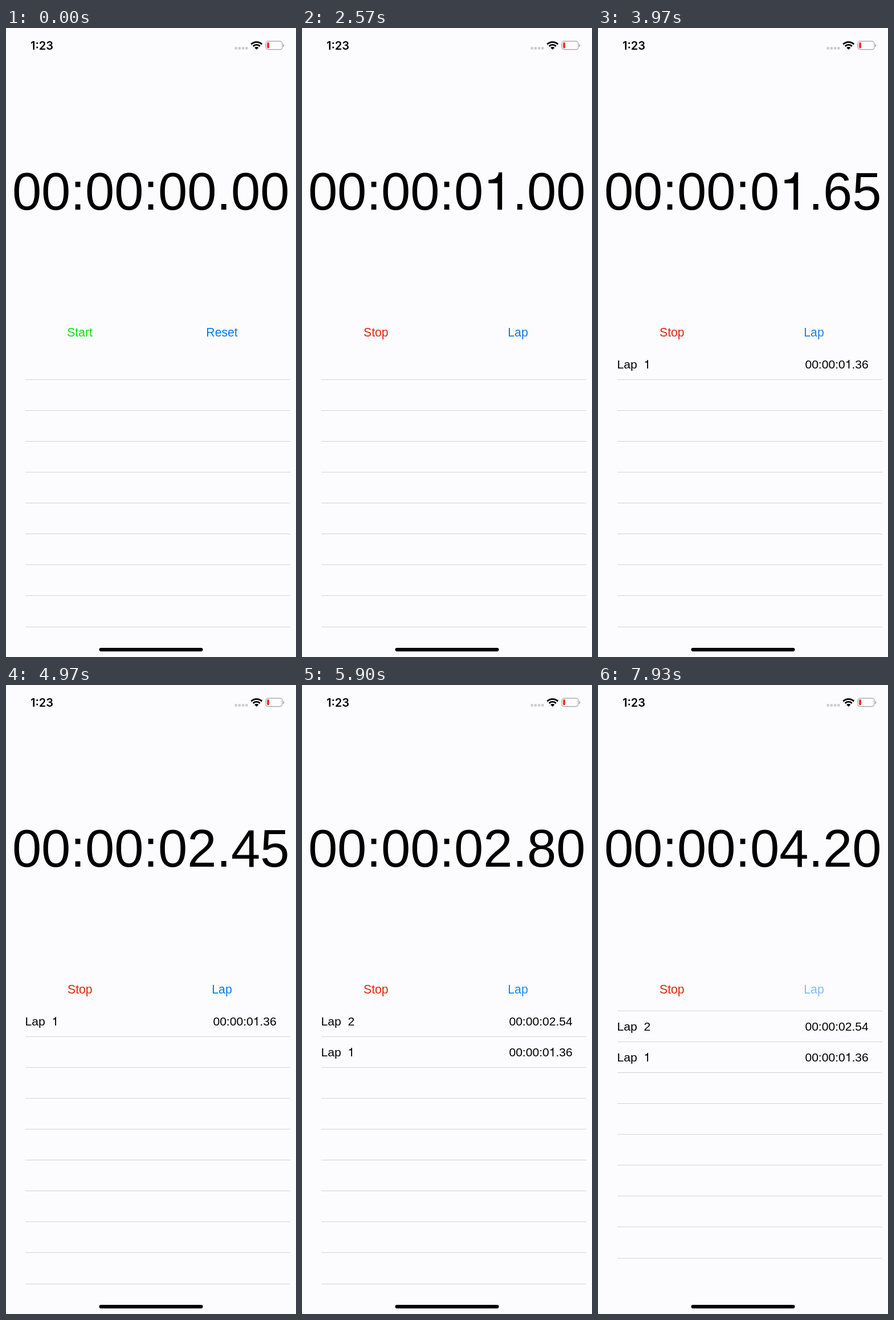
Animation, 509 px wide and 1101 px high, one loop 8000 ms. Source, as an HTML page with a canvas:

```html
<!DOCTYPE html>
<html lang="en">
<head>
<meta charset="utf-8">
<title>Stopwatch</title>
<style>
  html, body { margin: 0; width: 100%; height: 100%; overflow: hidden; background: #fcfcfe; }
  canvas { display: block; width: 509px; height: 1101px; }
</style>
</head>
<body>
<canvas id="stage"></canvas>
<script>
const W = 509, H = 1101, LOOP = 8000;
const SANS = '"Liberation Sans", Arial, Helvetica, sans-serif';
const BLUE = '#087aea', GREEN = '#0ae30e', RED = '#e0260a';
const ROW = 54.1, LIST_TOP = 561, FIRST_LINE = 614.7;
const SLIDE = 0.3, FADE = 0.45, PRESS = 0.06, DIM = 0.2;
const laps = [1.36, 2.54, 4.11];

// Playback time (ms) against stopwatch time (s); it runs slower while things animate.
const pace = [
  [1570, 0], [2570, 1.002], [2945, 1.365], [3390, 1.502], [4315, 1.81],
  [4970, 2.452], [5065, 2.55], [5900, 2.845], [6330, 2.99],
  [7010, 3.552], [7580, 4.11], [7930, 4.203]
];

const canvas = document.getElementById('stage');
const ctx = canvas.getContext('2d');
const dpr = window.devicePixelRatio || 1;
canvas.width = W * dpr;
canvas.height = H * dpr;

const clamp = x => Math.min(1, Math.max(0, x));

function stopwatch(t) {
  if (t <= pace[0][0]) return 0;
  for (let i = 1; i < pace.length; i++) {
    const [t0, c0] = pace[i - 1], [t1, c1] = pace[i];
    if (t < t1) return c0 + (c1 - c0) * (t - t0) / (t1 - t0);
  }
  return pace[pace.length - 1][1];
}

// cubic-bezier(.42, 0, .58, 1)
function easeInOut(x) {
  let lo = 0, hi = 1, s = 0.5;
  for (let i = 0; i < 24; i++) {
    s = (lo + hi) / 2;
    const bx = 3 * (1 - s) * (1 - s) * s * 0.42 + 3 * (1 - s) * s * s * 0.58 + s * s * s;
    if (bx < x) lo = s; else hi = s;
  }
  return s * s * (3 - 2 * s);
}

// Opacity of a button after it is let go
const glow = age => 1 - (1 - DIM) * (1 - clamp(age / FADE)) ** 2;

const format = sec => '00:00:' + sec.toFixed(2).padStart(5, '0');

// Footless numeral one
function drawOne(x, y, size) {
  ctx.save();
  ctx.translate(x, y);
  ctx.scale(size, -size);
  ctx.beginPath();
  ctx.moveTo(0.359, 0);
  ctx.lineTo(0.359, 0.709);
  ctx.lineTo(0.295, 0.709);
  ctx.bezierCurveTo(0.277, 0.61, 0.23, 0.572, 0.1, 0.567);
  ctx.lineTo(0.1, 0.503);
  ctx.lineTo(0.272, 0.503);
  ctx.lineTo(0.272, 0);
  ctx.fill();
  ctx.restore();
}

function drawText(str, x, y, size, color = '#000') {
  ctx.font = size + 'px ' + SANS;
  ctx.fillStyle = color;
  ctx.textAlign = 'left';
  str.split('1').forEach((part, i) => {
    if (i) {
      drawOne(x, y, size);
      x += ctx.measureText('1').width;
    }
    ctx.fillText(part, x, y);
    x += ctx.measureText(part).width;
  });
}

function drawButton(label, cx, color, alpha) {
  ctx.globalAlpha = alpha;
  ctx.font = '21.2px ' + SANS;
  ctx.fillStyle = color;
  ctx.textAlign = 'center';
  ctx.fillText(label, cx, 540);
  ctx.globalAlpha = 1;
}

function pill(x, y, w, h, r, color) {
  ctx.beginPath();
  ctx.roundRect(x, y, w, h, r);
  ctx.fillStyle = color;
  ctx.fill();
}

function drawStatus() {
  ctx.font = '600 20px Inter, "Open Sans", sans-serif';
  ctx.fillStyle = '#000';
  ctx.textAlign = 'center';
  ctx.fillText('1:23', 63, 38);

  for (let i = 0; i < 4; i++) pill(401.5 + i * 6.2, 33.3, 4.3, 4.4, 0.8, '#cbcbcd');

  // Wi-Fi fan
  const cx = 439.8, cy = 38, a = Math.PI * 0.25;
  ctx.strokeStyle = ctx.fillStyle = '#000';
  ctx.lineWidth = 2.9;
  for (const r of [13.4, 8.6]) {
    ctx.beginPath();
    ctx.arc(cx, cy, r, -Math.PI / 2 - a, -Math.PI / 2 + a);
    ctx.stroke();
  }
  ctx.beginPath();
  ctx.moveTo(cx, cy);
  ctx.arc(cx, cy, 5.1, -Math.PI / 2 - a, -Math.PI / 2 + a);
  ctx.fill();

  // Battery
  ctx.beginPath();
  ctx.roundRect(456, 23.2, 29, 14.4, 4);
  ctx.strokeStyle = '#a2a2a4';
  ctx.lineWidth = 1.2;
  ctx.stroke();
  pill(486.5, 28, 1.7, 5, [0, 1.5, 1.5, 0], '#a2a2a4');
  pill(458, 25.2, 4, 10.4, [2, 1, 1, 2], '#f0392b');
}

function drawList(clock) {
  const done = laps.filter(v => clock >= v + 0.01);
  const n = done.length;
  const shift = n ? Math.round((1 - easeInOut(clamp((clock - done[n - 1] - 0.01) / SLIDE))) * 54) : 0;
  ctx.save();
  ctx.beginPath();
  ctx.rect(0, LIST_TOP, W, H - LIST_TOP);
  ctx.clip();
  for (let k = 0; k < 9; k++) {
    ctx.fillStyle = '#d3d3d5';
    ctx.fillRect(34, Math.round(FIRST_LINE + k * ROW) - shift, 465, 1);
  }
  for (let k = 0; k < n; k++) {
    const y = 596 + k * 54 - shift;
    drawText('Lap  ' + (n - k), 33.5, y, 21.1);
    drawText(format(done[n - 1 - k]), 363.4, y, 21.1);
  }
  ctx.restore();
}

function render(t) {
  const clock = stopwatch(t), running = t >= 1570;
  ctx.setTransform(dpr, 0, 0, dpr, 0, 0);
  ctx.fillStyle = '#fcfcfe';
  ctx.fillRect(0, 0, W, H);
  drawStatus();

  // The display ticks in twentieths of a second
  drawText(format(Math.floor(clock * 20 + 1e-6) / 20), 10.9, 318, 92.1);

  if (running) {
    let alpha = 1;
    for (const v of laps) {
      if (clock >= v) alpha = glow(clock - v);
      else if (clock >= v - PRESS) alpha = DIM;
    }
    drawButton('Stop', 129.8, RED, glow(clock));
    drawButton('Lap', 379, BLUE, alpha);
  } else {
    drawButton('Start', 129.5, GREEN, t < 1500 ? 1 : DIM);
    drawButton('Reset', 379, BLUE, 1);
  }

  drawList(clock);
  pill(163.5, 1085, 182, 6.2, 3.1, '#000');
}

const start = performance.now();
function loop() {
  render((performance.now() - start) % LOOP);
  requestAnimationFrame(loop);
}
loop();
</script>
</body>
</html>
```
